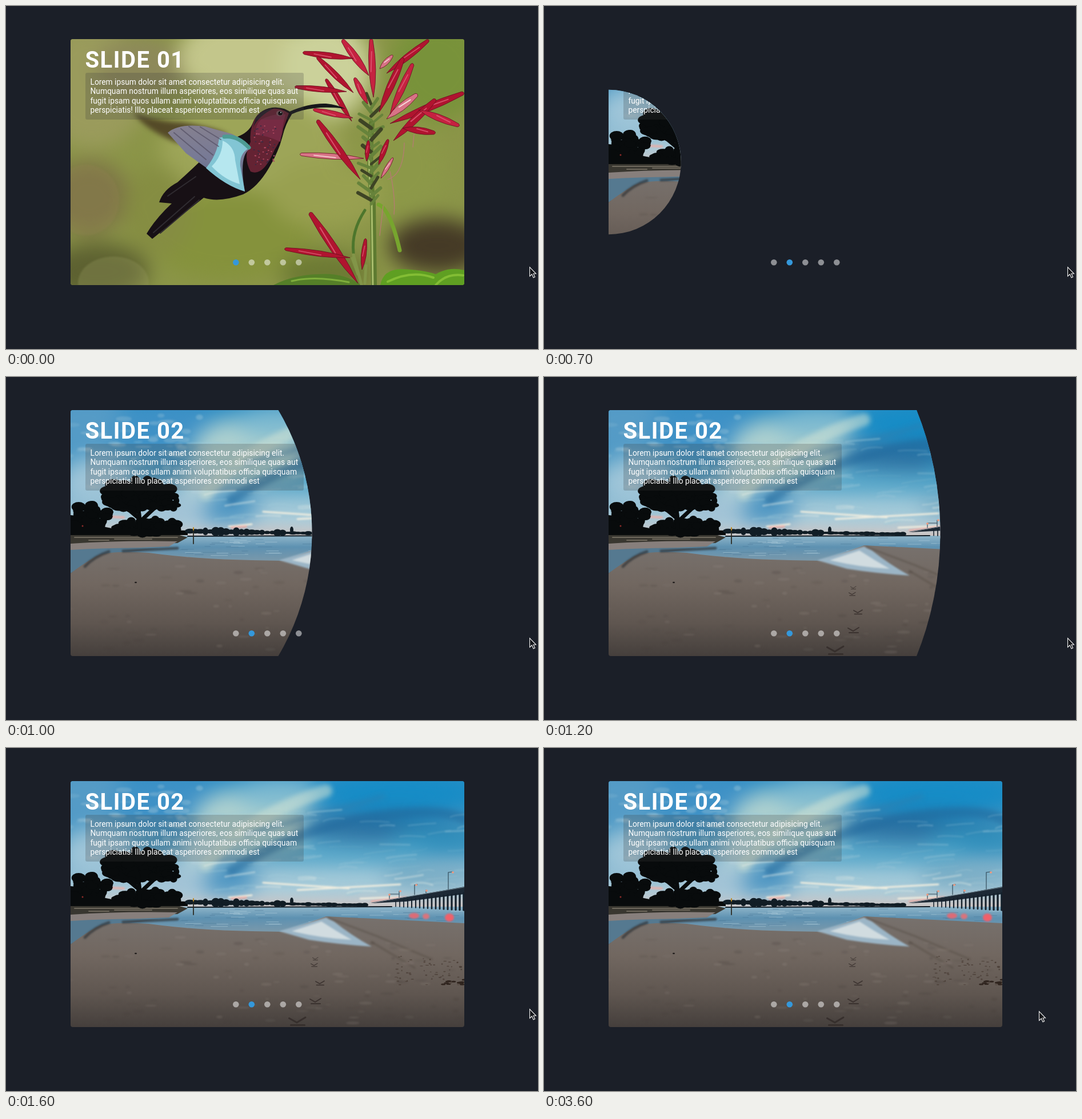
Write an HTML page that moves like this. It is 931 px wide and 601 px high and loops after 8 s.

```html
<!DOCTYPE html>
<html lang="en">
<head>
<meta charset="utf-8">
<title>Slider</title>
<style>
html, body { margin: 0; width: 100%; height: 100%; overflow: hidden; background: #1b1f28; }
svg { display: block; width: 931px; height: 601px; }
text { font-family: Roboto, sans-serif; fill: #fff; }
.title { font-size: 40px; font-weight: 700; letter-spacing: 1.5px; }
.copy { font-size: 13.77px; }
</style>
</head>
<body>
<svg id="stage" viewBox="0 0 931 601" xmlns="http://www.w3.org/2000/svg"></svg>
<script>
const LOOP = 8000, STEP = 100;
const MID = 273.5, LEFT = 113;

let seed = 7;
const rnd = (a = 0, b = 1) => {
  seed = (seed * 16807) % 2147483647;
  return a + (b - a) * seed / 2147483647;
};
const times = (n, make) => Array.from({ length: n }, (_, i) => make(i)).join('');
const oval = (x, y, rx, ry, fill, more = '') =>
  `<ellipse cx="${x}" cy="${y}" rx="${rx}" ry="${ry}" fill="${fill}" ${more}/>`;
const shape = (d, fill, more = '') => `<path d="${d}" fill="${fill}" ${more}/>`;
const line = (d, color, width, more = '') =>
  `<path d="${d}" fill="none" stroke="${color}" stroke-width="${width}" stroke-linecap="round" ${more}/>`;
const soft = (n, body) => `<g filter="url(#soft${n})">${body}</g>`;
const ramp = (id, ...stops) =>
  `<linearGradient id="${id}" x2="0" y2="1">${stops.map(([o, c]) =>
    `<stop offset="${o}" stop-color="${c}"/>`).join('')}</linearGradient>`;

// A tapered tube from base to tip with a lighter streak.
function petal([x, y, tx, ty, w], fill = '#b0142f', shine = '#e0607a') {
  const len = Math.hypot(tx - x, ty - y);
  const nx = (y - ty) / len * w / 2, ny = (tx - x) / len * w / 2;
  const mx = x + (tx - x) * .45, my = y + (ty - y) * .45;
  return shape(`M${x} ${y}Q${mx + nx * 1.7} ${my + ny * 1.7} ${tx + nx * .5} ${ty + ny * .5}
    Q${tx + (tx - x) / len * 5} ${ty + (ty - y) / len * 5} ${tx - nx * .5} ${ty - ny * .5}
    Q${mx - nx * 1.7} ${my - ny * 1.7} ${x} ${y}Z`, fill, 'stroke="#650f20" stroke-width=".8"') +
    line(`M${mx - nx * .4} ${my - ny * .4}L${tx - (tx - x) * .2} ${ty - (ty - y) * .2}`, shine, w * .15, 'opacity=".8"');
}

function garden() {
  const glow = [
    [150, 140, 100, 110, '#9a9b5c'], [235, 110, 80, 55, '#8d895a'], [420, 90, 120, 80, '#c3c68b'],
    [560, 110, 80, 90, '#cbd19a'], [755, 110, 85, 90, '#78923a'], [690, 280, 80, 90, '#8c9848'],
    [430, 250, 160, 100, '#9da558'], [145, 335, 70, 65, '#7d7446'], [390, 400, 150, 80, '#85923c'],
    [160, 465, 90, 50, '#5d6131'], [755, 420, 85, 48, '#453a26'], [560, 330, 100, 60, '#98a050'],
    [560, 470, 80, 40, '#6d7a34'], [265, 360, 60, 80, '#858d42']
  ];
  const blooms = [
    [635, 122, 590, 61, 13], [608, 92, 522, 82, 11], [608, 152, 546, 91, 11], [643, 160, 639, 60, 12],
    [666, 118, 738, 61, 11], [653, 186, 694, 93, 13], [672, 190, 711, 103, 12], [605, 202, 561, 130, 10],
    [596, 150, 508, 142, 10], [607, 196, 540, 182, 10], [672, 206, 799, 153, 13], [678, 236, 750, 165, 13],
    [722, 182, 791, 209, 12], [694, 214, 749, 222, 12], [620, 304, 546, 202, 13], [633, 172, 611, 128, 11],
    [631, 272, 634, 238, 8], [652, 278, 668, 236, 9]
  ];
  const pale = [[626, 267, 517, 260, 10], [666, 198, 718, 156, 13], [654, 110, 675, 88, 9], [656, 302, 676, 268, 7]];
  const low = [[616, 486, 533, 364, 14], [602, 441, 490, 426, 10], [623, 462, 629, 410, 9]];
  const body = `M500 188Q487 176 466 178Q440 182 431 207Q424 222 405 229L350 262Q330 282 300 309Q275 322 268 344
    L290 346Q262 372 246 399L256 408Q300 372 346 336Q374 345 415 330Q440 318 460 284Q477 256 484 228Q489 207 500 190Z`;
  return `<rect x="113" y="58" width="689" height="431" fill="#8b9548"/>` +
    soft(25, glow.map(g => oval(...g)).join('')) +
    soft(2, oval(140, 340, 58, 62, '#938355', 'opacity=".25"') + oval(188, 485, 62, 46, '#9a9c62', 'opacity=".3"')) +
    soft(6, shape('M222 186Q260 202 310 204Q370 214 390 226L300 240Q245 218 222 186Z', '#4a3d22', 'opacity=".85"')) +
    // foliage and stem
    shape('M655 489Q660 462 690 461Q730 462 752 470Q775 456 802 463V489Z', '#5f9f22') +
    line('M668 483Q710 462 748 476M752 489Q770 468 800 472', '#93cb3c', 4, 'opacity=".7"') +
    shape('M468 489Q500 472 545 470Q590 466 622 489Z', '#557f28') +
    line('M500 482Q540 472 600 484', '#7fae3c', 3) +
    line('M640 205Q634 280 642 345L644 489', '#5d7a30', 10, 'stroke-linecap="butt"') +
    line('M638 220Q632 280 640 345L642 489', '#a9bd6c', 3) +
    line('M652 348Q672 355 689 428', '#77a52e', 7) + line('M628 358Q604 395 608 432', '#4d762c', 5) +
    line('M697 240Q696 295 668 304M672 290Q682 335 679 365M660 350L654 402M714 225L712 247', '#b57b72', 1.3) +
    times(26, i => {
      const y = 160 + i * 7, s = i % 2 ? 1 : -1, w = rnd(8, 24);
      return line(`M639 ${y + 12}l${s * w} ${-rnd(8, 20)}`, i % 3 ? '#67833b' : '#3e4425', rnd(4, 7));
    }) +
    pale.map(p => petal(p, '#d87386', '#fff0ee')).join('') +
    blooms.map((p, i) => petal(p, i % 3 ? '#b0142f' : '#c52240')).join('') +
    low.map(p => petal(p)).join('') +
    line('M622 488L608 436M628 486L630 455M616 470L606 442', '#829548', 5) +
    // bird
    soft(1, shape(body, '#171015') +
      shape('M495 188Q468 170 440 191Q425 213 428 238Q414 265 428 290Q450 300 470 252Q484 230 485 215Z', '#642333') +
      shape('M489 190Q470 187 446 199Q435 210 437 226Q455 226 480 238Q484 210 489 190Z', '#762b43') +
      shape('M432 213Q444 191 468 180Q449 180 438 194Z', '#29202a') +
      shape('M283 222Q302 205 348 211L395 224Q424 238 427 250Q407 262 418 325Q386 315 354 286L315 258Z', 'url(#wing)') +
      shape('M373 231Q398 223 427 248Q408 258 410 280L418 325Q384 315 350 284Q370 260 373 231Z', '#82c5d4') +
      shape('M379 236Q400 245 401 270L409 312Q383 305 360 281Q379 262 379 236Z', '#b6e7ef') +
      line('M382 229Q405 226 425 248', '#4d9b93', 7)) +
    line('M294 222L350 269M306 215L362 261M320 211L372 246M340 212L376 234', '#555064', 2, 'opacity=".7"') +
    line('M258 397L330 334M270 398L338 340M283 333L332 299', '#302c31', 2) +
    times(65, () => oval(rnd(434, 472), rnd(210, 278), 1.4, 1, rnd() > .5 ? '#ad4960' : '#382b42')) +
    shape('M496 185Q530 170 560 171Q580 173 594 180Q563 176 540 179Q515 182 499 190Z', '#16171a') +
    oval(479, 188, 6, 5, '#75525a') + oval(480, 188, 3.8, 3.6, '#08080a') + oval(481, 186.5, 1, 1, '#fff');
}

function beach() {
  const tone = [
    [140, 80, 80, 55, '#559bc6'], [280, 95, 95, 45, '#3f91c6'], [160, 185, 65, 45, '#9fc5d8'],
    [430, 130, 105, 60, '#add0cf'], [480, 80, 80, 28, '#7ebad0'], [690, 80, 150, 38, '#168cc6'],
    [660, 140, 150, 24, '#296e9f'], [760, 160, 90, 24, '#3190bc'], [380, 225, 65, 32, '#4d95c2'],
    [590, 185, 150, 20, '#58a8ca'], [570, 230, 140, 16, '#a9cedb'], [340, 185, 35, 30, '#b9d5d9'],
    [740, 225, 80, 20, '#79acc4'], [300, 235, 55, 24, '#a2c3d6']
  ];
  const clump = (n, x, y, rx, ry, r) => times(n, () => {
    const a = rnd(0, 6.283), k = Math.sqrt(rnd());
    return oval(x + Math.cos(a) * rx * k, y + Math.sin(a) * ry * k, rnd(r * .5, r), rnd(r * .35, r * .7), '#080b0c');
  });
  const print = (x, y, s) => line(`M${x - 9 * s} ${y - 5 * s}L${x} ${y}L${x + 10 * s} ${y - 6 * s}M${x - 7 * s} ${y + 3 * s}L${x + 9 * s} ${y + 3 * s}`, '#332b28', 2 * s, 'opacity=".8"');
  return `<rect x="113" y="58" width="689" height="225" fill="url(#sky)"/>` +
    soft(25, tone.map(t => oval(...t)).join('')) +
    soft(6, line('M350 205Q420 120 560 75', '#d0e2d4', 22, 'opacity=".55"') +
      line('M395 215Q500 145 630 123T802 125', '#246b9d', 18, 'opacity=".55"') +
      line('M420 150Q520 125 660 85', '#327caa', 9, 'opacity=".4"')) +
    soft(2, times(80, () => {
      const x = rnd(315, 800), y = rnd(110, 262);
      return line(`M${x} ${y}q${rnd(10, 22)} ${rnd(-7, 0)} ${rnd(25, 60)} ${rnd(-8, 1)}`,
        y > 205 && rnd() > .5 ? '#e5ece6' : '#9ec8d8', rnd(1, 3.5), `opacity="${rnd(.15, .5)}"`);
    }) + times(65, () => oval(rnd(113, 350), rnd(65, 205), rnd(5, 15), rnd(2, 5), '#bdd7df', `opacity="${rnd(.1, .32)}"`)) +
      line('M450 236L600 246M510 249L690 239M390 262L430 258M620 264L690 261', '#f1eee0', 3) +
      line('M395 264L420 262M640 269L700 262M185 245L206 246', '#e4b0ab', 4)) +
    // water
    `<rect x="113" y="278" width="689" height="50" fill="url(#sea)"/>` +
    soft(1, times(60, () => {
      const x = rnd(290, 790);
      return line(`M${x} ${rnd(282, 317)}h${rnd(8, 30)}`, rnd() > .5 ? '#b9d5e2' : '#4b7998', 1, 'opacity=".5"');
    })) +
    soft(2, oval(714, 294, 9, 5, '#dc6b76') + oval(735, 295, 6, 5, '#d9747c') + oval(776, 297, 8, 7, '#f0606a')) +
    // shore
    shape('M113 276H300L318 281L300 291L190 294L113 302Z', '#393730') +
    line('M120 281H300M145 286H180M190 284H255', '#6e685c', 2) +
    shape('M113 292Q200 286 300 288L285 297Q210 300 113 304Z', '#877f7c') +
    shape('M113 303Q190 298 268 300L200 309Q160 315 113 344Z', '#557990') +
    shape('M113 344Q142 322 163 312Q185 304 250 308Q330 319 430 321L485 322L560 295L802 307V489H113Z', 'url(#sand)') +
    soft(2, line('M138 332Q155 314 180 306M205 305L300 300', '#333538', 5, 'opacity=".7"') +
      shape('M478 321L515 310L560 297L574 304Q604 328 640 348Q580 344 530 336Z', '#9bb5c6') +
      shape('M500 321L552 304Q578 321 605 336Q555 334 500 321Z', '#d1dce0') +
      line('M565 298L650 330L745 370M640 340L715 385', '#51483f', 4, 'opacity=".35"') +
      times(100, () => oval(rnd(113, 802), rnd(330, 485), rnd(3, 12), rnd(1, 3),
        rnd() > .45 ? '#443d39' : '#9a9088', `opacity="${rnd(.08, .25)}"`))) +
    times(65, () => oval(rnd(680, 800), rnd(365, 415), rnd(1, 3), rnd(.5, 1.4), '#3b2d25', 'opacity=".5"')) +
    times(14, () => oval(rnd(765, 802), rnd(405, 415), 4, 1.5, '#30251f')) +
    oval(227, 360, 2, 1.3, '#211d1c') +
    print(509, 481, 1.5) + print(541, 445, 1) + print(549, 413, .8) + print(539, 381, .6) + print(541, 370, .5) +
    // trees and far bank
    clump(95, 232, 206, 58, 27, 15) + clump(28, 278, 222, 24, 10, 10) + clump(48, 145, 245, 35, 22, 13) +
    clump(50, 247, 262, 58, 12, 13) + line('M234 270Q236 240 226 210M236 252L268 222M233 248L200 220', '#080b0c', 7) +
    shape('M113 251L190 266L318 269V277H113Z', '#080b0c') +
    times(35, i => oval(322 + i * 9, 275 - Math.max(0, 5 - i * .16), rnd(5, 9), rnd(2, i < 20 ? 8 : 4), '#111d25')) +
    line('M318 279L675 278', '#15212a', 2) + oval(500, 268, 3, 6, '#111d25') +
    line('M328 268V292', '#2c2c24', 1.8) + line('M328 264V268', '#bd8c29', 2) +
    oval(134, 261, 1.5, 1.5, '#8d2b28') +
    // bridge
    shape('M640 272L802 243V256L700 269Z', '#1d2935') + line('M640 271L802 244', '#647783', 1.2) +
    times(18, i => line(`M${682 + i * 7} ${268 - i * .8}V${278 + i * .35}`, '#14202b', 1.5 + i * .12)) +
    line('M774 248V218L781 217M715 257V240L720 239M688 262V251M671 264V256H688M735 254V249', '#344c5b', 1.2) +
    [[782, 218], [718, 240], [736, 250], [690, 251], [671, 257]].map(([x, y]) => oval(x, y, 2, 1.8, '#ef9b82')).join('');
}

const copy = [
  'Lorem ipsum dolor sit amet consectetur adipisicing elit.',
  'Numquam nostrum illum asperiores, eos similique quas aut',
  'fugit ipsam quos ullam animi voluptatibus officia quisquam',
  'perspiciatis! Illo placeat asperiores commodi est'
];
const caption = n => `<text class="title" x="138.5" y="107.5">SLIDE ${n}</text>
  <rect x="139" y="117" width="382" height="82" rx="3" fill="#3c3c3c" fill-opacity=".23"/>` +
  copy.map((s, i) => `<text class="copy" x="147.5" y="${138 + i * 16.36}">${s}</text>`).join('');

const stage = document.getElementById('stage');
stage.innerHTML = `<defs>
  ${[1, 2, 6, 25].map(n => `<filter id="soft${n}" x="-30%" y="-30%" width="160%" height="160%" color-interpolation-filters="sRGB"><feGaussianBlur stdDeviation="${n * .7}"/></filter>`).join('')}
  ${ramp('wing', [0, '#85808f'], [.5, '#777a96'], [1, '#50637e'])}
  ${ramp('sky', [0, '#328fc4'], [.5, '#559fc6'], [.85, '#adcad7'], [1, '#d4c5c1'])}
  ${ramp('sea', [0, '#90b6ca'], [.4, '#5d91b1'], [1, '#819aa9'])}
  ${ramp('sand', [0, '#77716d'], [.35, '#716760'], [.7, '#5f5650'], [1, '#453f3c'])}
  <clipPath id="frame"><rect x="113" y="58" width="689" height="431" rx="4"/></clipPath>
  <clipPath id="iris"><circle id="hole" cx="${LEFT}" cy="${MID}" r="0"/></clipPath></defs>
  <rect width="931" height="601" fill="#1b1f28"/>
  <g clip-path="url(#frame)">
    <g id="one">${garden()}${caption('01')}</g>
    <g id="two" clip-path="url(#iris)">${beach()}${caption('02')}</g>
  </g>
  ${times(5, i => `<circle class="dot" cx="${402.3 + i * 27.5}" cy="449.3" r="5.3"/>`)}
  <path id="cursor" d="M.5 .5V16.5L4.3 13L7 19L9.6 17.8L7 12H11.5Z" fill="#14161a" stroke="#f2f2f2" stroke-width="1.1"/>`;

const $ = id => document.getElementById(id);
const one = $('one'), two = $('two'), hole = $('hole'), cursor = $('cursor');
const dots = [...document.querySelectorAll('.dot')];

// Cubic Bezier (.25, .1, .25, 1)
function ease(x) {
  if (x <= 0) return 0;
  if (x >= 1) return 1;
  let lo = 0, hi = 1;
  const curve = (a, b, u) => 3 * a * u * (1 - u) ** 2 + 3 * b * u * u * (1 - u) + u ** 3;
  for (let i = 0; i < 24; i++) {
    const u = (lo + hi) / 2;
    if (curve(.25, .25, u) < x) lo = u; else hi = u;
  }
  return curve(.1, 1, lo);
}

const path = [[916, 457], [916, 456], [907, 453], [882, 457], [866, 461]];

function draw(t) {
  const second = t >= 500;
  one.style.display = second ? 'none' : '';
  two.style.display = second ? '' : 'none';
  hole.setAttribute('r', 862 * ease((t - 452) / 1900));
  dots.forEach((dot, i) => {
    const on = i === (second ? 1 : 0);
    dot.setAttribute('fill', on ? '#3498db' : '#fff');
    dot.setAttribute('fill-opacity', on ? 1 : .5);
  });
  const k = Math.max(0, Math.min(4, (t - 3200) / STEP));
  cursor.setAttribute('transform', `translate(${path[k]})`);
}

let shown = -1;
function tick() {
  const t = Math.floor(performance.now() % LOOP / STEP) * STEP;
  if (t !== shown) draw(shown = t);
  requestAnimationFrame(tick);
}
tick();
</script>
</body>
</html>
```
